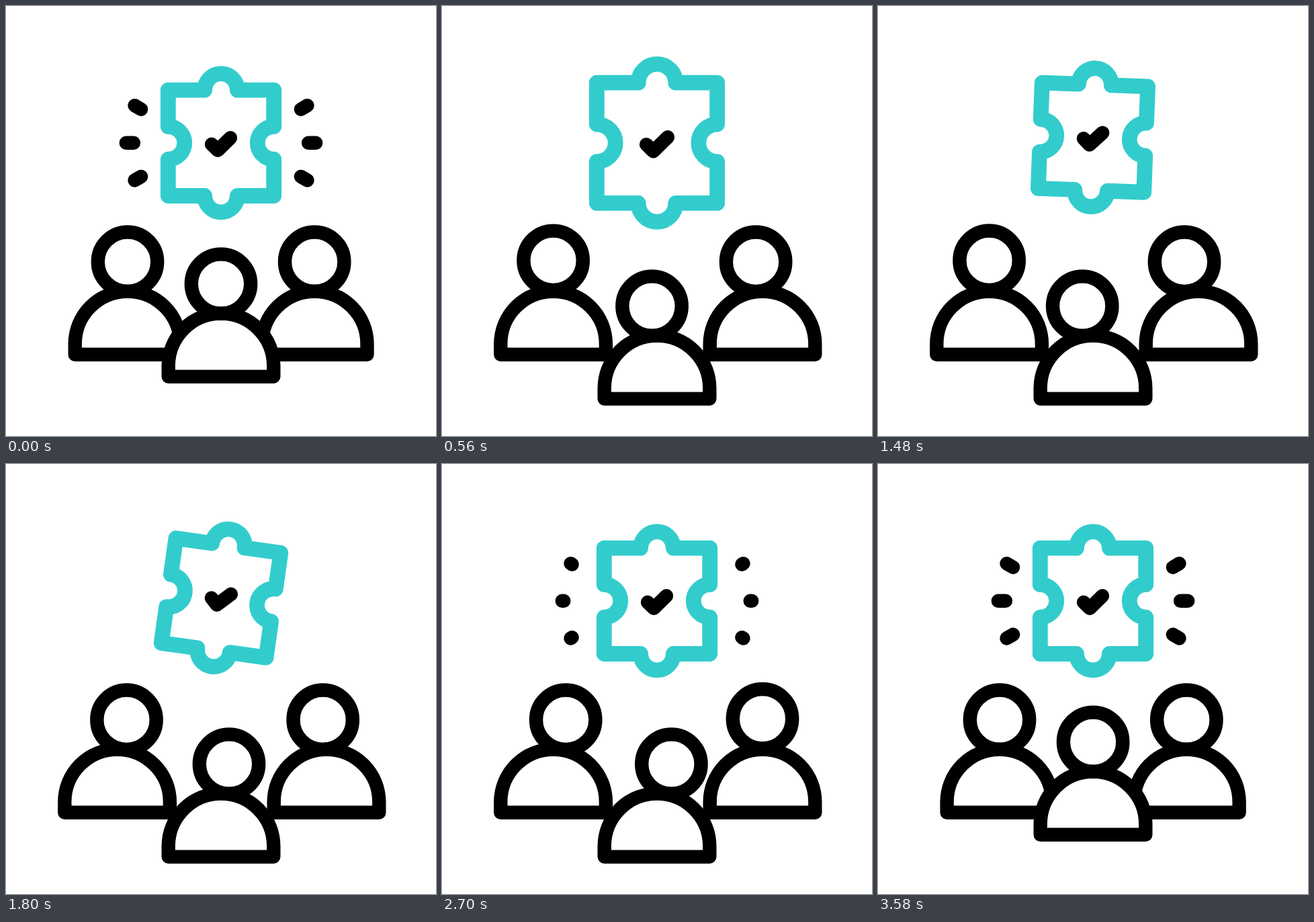
An HTML page with a canvas for the animation above (3.6 s loop, 640 by 640 pixels).

```html
<!DOCTYPE html>
<html lang="en">
<head>
<meta charset="utf-8">
<title>Team solution</title>
<style>
  html, body { margin: 0; width: 100%; height: 100%; overflow: hidden; background: #fff; }
  canvas { display: block; width: 640px; height: 640px; }
</style>
</head>
<body>
<canvas id="stage" width="640" height="640"></canvas>
<script>
const ctx = document.getElementById('stage').getContext('2d');
const LOOP = 3600;
const CENTER = 320;
const BLACK = '#000';
const TEAL = '#33cccc';
const LINE = 20.4;

// Smooth rise from 0 to 1.
function ease(t, start, duration) {
  const x = Math.min(1, Math.max(0, (t - start) / duration));
  return x * x * (3 - 2 * x);
}

// Rises at one time and falls again at a later one.
function pulse(t, rise, fall, duration) {
  return ease(t, rise, duration) - ease(t, fall, duration);
}

// A sine that runs only between two times.
function swing(t, start, end, halfPeriod) {
  return t > start && t < end ? Math.sin((t - start) / halfPeriod * Math.PI) : 0;
}

function stroke(color, width) {
  ctx.strokeStyle = color;
  ctx.lineWidth = width;
  ctx.stroke();
}

// x and y place the resting head; the offsets move the head alone.
function drawPerson(x, y, headX, headY) {
  const radius = 78.3;
  const shoulder = y + 122.3;
  const base = y + 138;
  ctx.beginPath();
  ctx.moveTo(x - radius, base);
  ctx.arc(x, shoulder, radius, Math.PI, 0);
  ctx.lineTo(x + radius, base);
  ctx.closePath();
  ctx.fillStyle = '#fff';
  ctx.fill();
  stroke(BLACK, LINE);

  ctx.beginPath();
  ctx.arc(x + headX, y + headY, 44.2, 0, 2 * Math.PI);
  stroke(BLACK, LINE);
}

function drawCheck(scale) {
  ctx.beginPath();
  ctx.moveTo(-14 * scale, 2 * scale);
  ctx.lineTo(-4.8 * scale, 11 * scale);
  ctx.lineTo(14 * scale, -7.6 * scale);
  stroke(BLACK, LINE);
}

// Four sides: knobs above and below, notches left and right.
function drawPuzzle(y, scale, angle) {
  const half = 78.7 * scale;
  const knob = 24.4 * scale;
  ctx.save();
  ctx.translate(CENTER, y);
  ctx.rotate(angle);
  ctx.beginPath();
  for (let side = 0; side < 4; side++) {
    ctx.lineTo(-half, -half);
    ctx.arc(0, -half, knob, Math.PI, 0, side % 2 === 1);
    ctx.rotate(Math.PI / 2);
  }
  ctx.closePath();
  stroke(TEAL, 22.8);
  drawCheck(scale);
  ctx.restore();
}

// Three rays per side, anchored at their outer ends.
function drawRays(grown) {
  if (grown <= 0) return;
  const length = 11.1 * grown;
  ctx.beginPath();
  for (const side of [-1, 1]) {
    for (let row = -1; row <= 1; row++) {
      const x = CENTER + side * (141.2 - 12.7 * Math.abs(row));
      const y = 203.8 + 55.6 * row;
      const angle = row * Math.PI / 6;
      ctx.moveTo(x, y);
      ctx.lineTo(x - side * length * Math.cos(angle), y - length * Math.sin(angle));
    }
  }
  stroke(BLACK, LINE);
}

function draw(t) {
  ctx.fillStyle = '#fff';
  ctx.fillRect(0, 0, 640, 640);
  ctx.lineCap = ctx.lineJoin = 'round';

  const spread = pulse(t, 0, 3180, 420);
  const lookLeft = pulse(t, 460, 1660, 210);
  const lookRight = ease(t, 1660, 210) - ease(t, 3180, 420);
  const leftNod = -3 * swing(t, 420, 1620, 200) ** 2;
  const rightNod = -3 * swing(t, 1850, 3050, 200) ** 2;

  const lift = 8.1 * pulse(t, 690, 1680, 260);
  const pop = 1 + 0.3 * pulse(t, 522, 604, 82);
  const tilt = -Math.PI / 18 * swing(t, 947, 2447, 500);

  drawRays(1 - pulse(t, 0, 2640, 200));
  drawPuzzle(203.8 - lift, pop, tilt);

  drawPerson(181 - 15.4 * spread, 380.7, 18.6 * lookRight, leftNod);
  drawPerson(459.2 + 17.8 * spread, 380.7, -21 * lookLeft, rightNod);
  drawPerson(CENTER, 413.6 + 33 * spread, 21.4 * lookRight - 15.8 * lookLeft, 0);
}

function tick() {
  draw(performance.now() % LOOP);
  requestAnimationFrame(tick);
}
tick();
</script>
</body>
</html>
```
